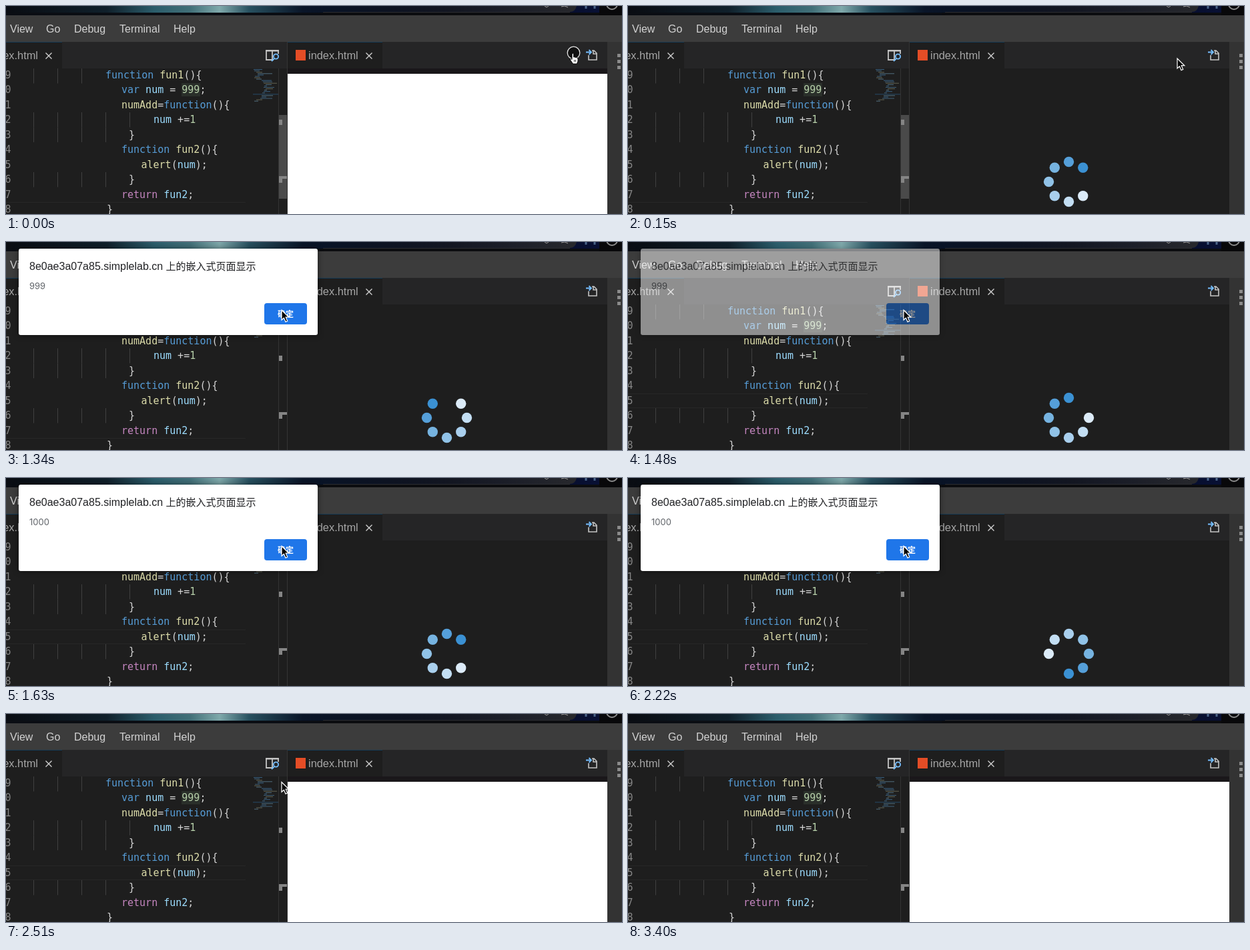
An HTML page that plays this animation: 923 by 313 pixels, repeating every 3700 ms.

```html
<!DOCTYPE html>
<html lang="en">
<head>
<meta charset="utf-8">
<title>Closure counter in an online editor</title>
<style>
  html, body { margin: 0; width: 100%; height: 100%; overflow: hidden; background: #1e1e1e; }
  svg { display: block; }
  text { white-space: pre; }
  .ui { font: 16px "Liberation Sans", Arial, sans-serif; fill: #d2d2d2; }
  .tab { font: 16.4px "Liberation Sans", Arial, sans-serif; fill: #a6a6a6; }
  .code { font: 15px "DejaVu Sans Mono", Menlo, monospace; fill: #d4d4d4; }
  .cjk { font-family: "Noto Sans CJK SC", "Noto Sans CJK", sans-serif; }
  .k { fill: #569cd6; } .f { fill: #dcdcaa; } .v { fill: #9cdcfe; }
  .n { fill: #b5cea8; } .r { fill: #c586c0; } .g { fill: #858585; }
  #dialog { filter: drop-shadow(0 0 4px rgba(0, 0, 0, .5)); }
</style>
</head>
<body>
<svg width="923" height="313" viewBox="0 0 923 313" xmlns="http://www.w3.org/2000/svg">
  <defs>
    <linearGradient id="sky">
      <stop offset="0" stop-color="#090c12"/>
      <stop offset=".17" stop-color="#10202b"/>
      <stop offset=".25" stop-color="#2b5d6b"/>
      <stop offset=".31" stop-color="#416f78"/>
      <stop offset=".36" stop-color="#7fa9ab"/>
      <stop offset=".41" stop-color="#27505f"/>
      <stop offset=".5" stop-color="#0a1528"/>
      <stop offset=".75" stop-color="#050a1c"/>
      <stop offset="1" stop-color="#081034"/>
    </linearGradient>
    <linearGradient id="bar">
      <stop offset="0" stop-color="#1b1d22" stop-opacity="0"/>
      <stop offset="1" stop-color="#27282c"/>
    </linearGradient>
  </defs>

  <!-- browser strip -->
  <rect width="923" height="14" fill="#0b0c0f"/>
  <rect width="889" height="10" fill="url(#sky)"/>
  <rect y="10" width="470" height="4" fill="#0a0d13"/>
  <rect x="889" width="34" height="14" fill="#08080a"/>
  <path d="M475 0H855Q853 9 844 9H475Z" fill="url(#bar)"/>
  <path d="M475 9.5H845" stroke="#2c2d31"/>
  <path d="M807 0l3 2 3-2M832 1l5-1 5 2" stroke="#9a9a9a" fill="none"/>
  <path d="M869 0v4M882 0v4" stroke="#4a6488" stroke-width="3"/>
  <circle cx="908" cy="-3" r="8" fill="none" stroke="#8a8a8a" stroke-width="2"/>

  <!-- menu -->
  <rect y="14" width="923" height="40" fill="#3c3c3c"/>
  <g class="ui">
    <text x="6" y="40">View</text><text x="60" y="40">Go</text>
    <text x="102" y="40">Debug</text><text x="170" y="40">Terminal</text>
    <text x="251" y="40">Help</text>
  </g>

  <!-- panes -->
  <rect y="54" width="901" height="40" fill="#252526"/>
  <rect y="94" width="422" height="219" fill="#1e1e1e"/>
  <path d="M0 54h84v40H0zM422 54h142v40H422z" fill="#1e1e1e"/>
  <path d="M0 54.5h84M422 54.5h142" stroke="#143a54"/>
  <text class="tab" x="48" y="80" text-anchor="end">index.html</text>
  <text class="tab" x="453" y="80">index.html</text>
  <path d="M59.5 70.5l9 9m0-9l-9 9M539.5 70.5l9 9m0-9l-9 9" stroke="#d0d0d0" stroke-width="1.4"/>
  <rect x="434" y="66" width="15" height="16" fill="#e44d26"/>
  <g fill="none" stroke-width="1.8">
    <path d="M401 81H390V67H408V72M399 67V81M389 67.5H409" stroke="#c5c5c5"/>
    <circle cx="404.500" cy="76" r="3.6" stroke="#75beff"/>
    <path d="M402 79l-4 4" stroke="#75beff"/>
    <path d="M878 67h3l4 4v10h-12v-7M880 67v5h5" stroke="#c5c5c5" stroke-width="1.6"/>
    <path d="M869 69.500h8m-3.500-3.500l3.500 3.500-3.500 3.500" stroke="#75beff"/>
  </g>
  <rect x="901" y="54" width="22" height="259" fill="#333"/>
  <path d="M916 74.500h7M916 83.500h7M916 92.500h7" stroke="#8a8a8a" stroke-width="5" stroke-dasharray="5 2"/>

  <g id="editor"></g>
  <path d="M408.500 94V313M421.500 54V313" stroke="#343434"/>
  <rect id="slider" x="409" y="164" width="12" height="126" fill="#4a4a4a"/>
  <path d="M409 171h5v8h-5zM409 256h12v4h-7v6h-5z" fill="#858585"/>

  <!-- preview -->
  <rect x="422" y="94" width="479" height="219" fill="#1e1e1e"/>
  <g id="page">
    <rect x="422" y="94" width="479" height="8" fill="#1a171a"/>
    <rect x="422" y="102" width="479" height="211" fill="#fff"/>
  </g>
  <g id="spinner"></g>

  <g id="dialog">
    <rect x="19" y="10" width="448" height="130" rx="3" fill="#fff"/>
    <text class="ui" x="35" y="42" style="fill:#202124">8e0ae3a07a85.simplelab.cn <tspan class="cjk" font-size="15" style="font-size:15px">上的嵌入式页面显示</tspan></text>
    <text id="value" x="35" y="71" style="font:13px Inter,Roboto,sans-serif;fill:#5f6368"></text>
    <rect x="387" y="92" width="64" height="32" rx="4" fill="#1f76e9"/>
    <text class="cjk" x="407" y="112.500" font-size="12" font-weight="700" fill="#fff">确定</text>
  </g>

  <g id="hand">
    <circle cx="850.500" cy="70.500" r="9.300" fill="#111" stroke="#e4e4e4" stroke-width="1.300"/>
    <path d="M848 72q1.500-1.500 2.700 0v5q1.200-1 2.400.4q1.300-.8 2.200.5q1.500-.3 1.700 1.200v4l-1.500 4h-6l-4-6q-.7-2 1.200-1.700l1.300 1z"
      fill="#fff" stroke="#000"/>
    <path d="M851.500 81v3m2-3v3" stroke="#000" stroke-width=".8"/>
  </g>
  <path id="arrow" d="M0 0V14.800L3.400 11.700 6 17.600 8.700 16.500 6.200 10.700H10.800Z" fill="#000" stroke="#fff" stroke-width="1.200"/>
</svg>

<script>
const LOOP = 3700;
const $ = id => document.getElementById(id);

function add(parent, tag, attrs, text) {
  const el = document.createElementNS("http://www.w3.org/2000/svg", tag);
  for (const key in attrs) el.setAttribute(key, attrs[key]);
  if (text !== undefined) el.textContent = text;
  return parent.appendChild(el);
}

// Each line: x, indent guides, then [class, text] pieces
const lines = [
  [149, 3, ["k", "function"], ["f", " fun1"], ["", "(){"]],
  [173, 0, ["k", "var"], ["v", " num"], ["", " = "], ["n", "999"], ["", ";"]],
  [173, 0, ["f", "numAdd"], ["", "="], ["k", "function"], ["", "(){"]],
  [221, 5, ["v", "num"], ["", " +="], ["n", "1"]],
  [184, 4, ["", "}"]],
  [173, 0, ["k", "function"], ["f", " fun2"], ["", "(){"]],
  [202.5, 0, ["f", "alert"], ["", "("], ["v", "num"], ["", ");"]],
  [184, 4, ["", "}"]],
  [173, 0, ["r", "return"], ["v", " fun2"], ["", ";"]],
  [151, 0, ["", "}"]]
];
const lineTop = i => 92.5 + i * 22.5;

const editor = $("editor");
const current = add(editor, "path", { fill: "none", stroke: "#272727" });
add(editor, "rect", { x: 263, y: 116, width: 28, height: 20, fill: "#2a2f2a" });
lines.forEach(([x, guides, ...parts], i) => {
  const top = lineTop(i);
  for (let k = 0; k < guides; k++)
    add(editor, "rect", { x: 41 + 36 * k, y: Math.max(94, top), width: 1, height: 22.5, fill: "#404040" });
  add(editor, "text", { x: -1.5, y: top + 16, class: "code g" }, (i + 9) % 10);
  const row = add(editor, "text", { x, y: top + 16, class: "code" });
  for (const [cls, text] of parts) add(row, "tspan", { class: cls }, text);
});

// Minimap rows: indent, length
const rows = [[1, 13], [2, 8], [5, 9], [7, 22], [7, 9], [3, 7], [2, 9], [5, 8], [13, 15], [15, 14], [16, 20],
  [19, 9], [17, 4], [16, 16], [19, 11], [17, 4], [16, 10], [14, 4], [0, 38], [13, 17], [13, 7], [11, 18], [5, 9], [2, 6]];
const tones = ["#3f709a", "#5c7f93", "#72725c", "#49708c"];
rows.forEach(([x, w], i) => add(editor, "rect", {
  x: 370 + x, y: 95 + i * 2.07, width: w, height: 1.1,
  fill: w > 30 ? "#285577" : tones[i * 7 % 4], opacity: .75
}));

const dots = Array.from({ length: 8 }, (_, i) => add($("spinner"), "circle", {
  cx: 660.5 + 30 * Math.sin(i * Math.PI / 4),
  cy: 264.5 - 30 * Math.cos(i * Math.PI / 4), r: 7.7
}));
const shades = ["#3b91d3", "#559fd9", "#76b3e0", "#90c2e7", "#a9cfed", "#c3def3", "#dcebf8", "none"];

// Tables of [time, value]
const pointer = [[0, null], [150, [823, 79]], [300, [750, 84]], [450, [436.5, 106]], [750, [410.5, 115.5]],
  [890, [404, 117]], [1040, [410, 105]], [1190, [413, 102.5]], [2650, [505, 93]],
  [2800, [738.5, 217.5]], [2950, [770, 274.5]], [3250, [905.5, 306.5]], [3400, null]];
const heads = [[0, 0], [150, 1], [300, 2], [600, 3], [750, 4], [890, 5], [1040, 6], [1340, 7],
  [1480, 0], [1630, 1], [1920, 2], [2070, 3], [2220, 4]];
const fade = [[0, 0], [300, 1], [1480, .5], [1630, 1], [2360, .5], [2510, 0]];

const at = (table, t) => table.filter(step => step[0] <= t).pop()[1];
const show = (id, on) => $(id).setAttribute("visibility", on ? "visible" : "hidden");

function draw(t) {
  const loading = t >= 150 && t < 2360;
  show("page", !loading);
  show("spinner", loading);
  show("hand", t < 150);
  show("slider", t < 300);

  const head = at(heads, t);
  dots.forEach((dot, i) => dot.setAttribute("fill", shades[(head - i + 8) % 8]));

  const alpha = at(fade, t);
  show("dialog", alpha > 0);
  $("dialog").setAttribute("opacity", alpha);
  $("value").textContent = t < 1630 ? "999" : "1000";

  const top = Math.round(lineTop(t < 1480 ? 9 : 6)) + .5;
  current.setAttribute("d", `M0 ${top}H359M0 ${top + 21}H359`);

  const tip = at(pointer, t);
  show("arrow", tip);
  if (tip) $("arrow").setAttribute("transform", `translate(${tip})`);
}

const start = performance.now();
function tick() {
  draw((performance.now() - start) % LOOP);
  requestAnimationFrame(tick);
}
tick();
</script>
</body>
</html>
```
